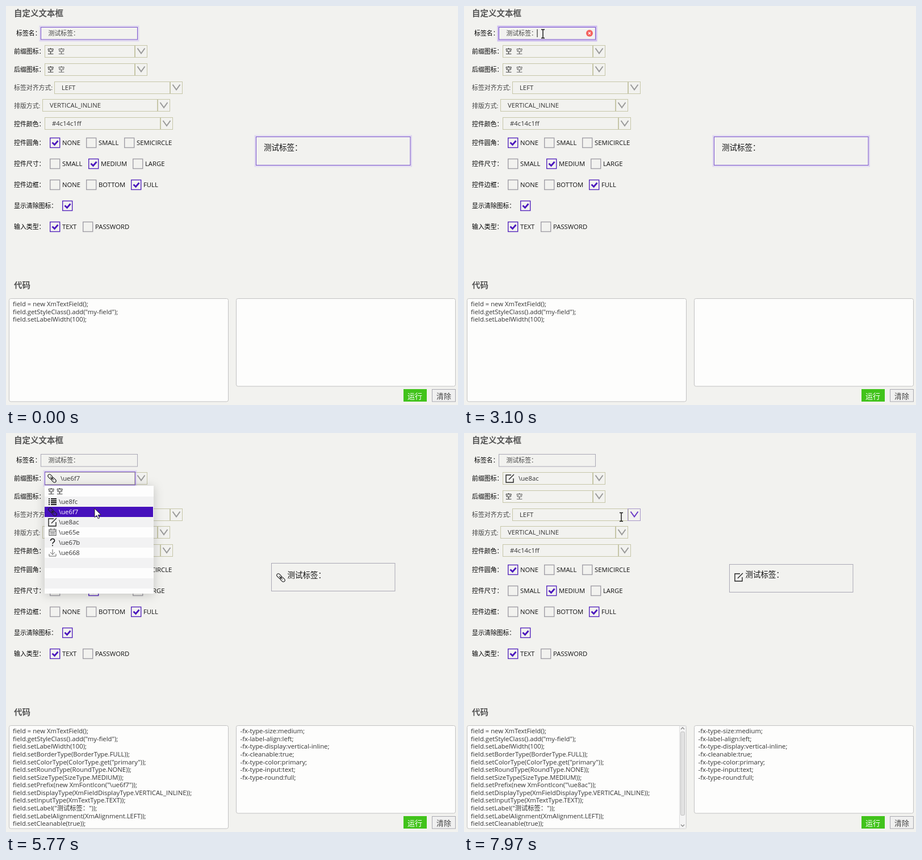
Recreate the animation shown at these times as an HTML page. Size 796 by 703 pixels, loop 8000 ms.

```html
<!DOCTYPE html>
<html lang="zh-CN">
<head>
<meta charset="utf-8">
<style>
html, body { margin: 0; width: 100%; height: 100%; overflow: hidden; background: #f2f2ef; }
svg { display: block; width: 796px; height: 703px; }
text { font: 11.3px "Open Sans", "Noto Sans CJK SC", "Noto Sans CJK", sans-serif; fill: #333; white-space: pre; }
.label { font-size: 10.9px; fill: #000; }
.soft { fill: #444; }
.dark { fill: #111; }
.title { font-size: 14.5px; font-weight: 700; fill: #555; }
.big { font-size: 13.5px; fill: #111; }
.button { font-size: 13px; }
.white { fill: #fff; }
.line { fill: none; stroke: #c6c6a8; }
.field { fill: none; stroke: #aaa8b5; }
.focus { fill: none; stroke: #7a55cc; }
.halo { fill: none; stroke: #b79df0; stroke-width: 3; opacity: .3; }
.area { fill: #fdfdfc; stroke: #c2c2c2; }
.chevron { fill: none; stroke: #9a9a9a; stroke-width: 2; }
.hot .chevron { stroke: #6a3cc6; }
.hot .side { stroke: #a796c8; }
.box { fill: none; stroke: #a09ea6; stroke-width: 1.4; }
.checked .box { stroke: #5526bd; }
.tick { fill: none; stroke: #4a14bd; stroke-width: 2.8; }
.icon { fill: none; stroke: #222; stroke-width: 1.1; }
#popup { filter: drop-shadow(0 2px 9px rgba(0, 0, 0, .2)); }
</style>
</head>
<body>
<svg id="stage" viewBox="0 0 796 703"></svg>
<script>
const LOOP = 8000, OPEN = 4740, PICK_LINK = 5770, PICK_EDIT = 6630, CLOSE = 7620;
const PURPLE = '#4610bc', LABEL = '测试标签：';
const ROW = 18, rowTop = i => 94 + i * ROW;

const text = (x, y, s, cls = '', id = '') => `<text x="${x}" y="${y}" class="${cls}" id="${id}">${s}</text>`;
const rect = (x, y, w, h, attrs) => `<rect x="${x}" y="${y}" width="${w}" height="${h}" ${attrs}/>`;
const group = (id, body) => `<g id="${id}">${body}</g>`;

// Icons are drawn around their centre.
const icons = {
  none: '',
  list: '<path d="M-7-5h2m2 0h10M-7-1.7h2m2 0h10M-7 1.7h2m2 0h10M-7 5h2m2 0h10" stroke-width="2.2"/>',
  link: '<g transform="rotate(45)"><rect x="-9" y="-2.8" width="9.5" height="5.6" rx="2.8"/><rect x="-.5" y="-2.8" width="9.5" height="5.6" rx="2.8"/><path d="M-4 0h8"/></g>',
  edit: '<path d="M2-6h-9v13h13v-7M-2 2L7-7" stroke-width="1.4"/>',
  calendar: '<path d="M-6-5h12v10.5h-12zM-6-2h12M-3-7v3M3-7v3M-4 .5h8M-4 3h8" stroke="#555"/>',
  help: '<path d="M-3.5-3c0-5 7.5-4.5 7 0c-.4 2.5-3.5 2.5-3.5 5.2M0 4.2v2" stroke-width="1.7"/>',
  download: '<path d="M0-6v9M-4-1L0 3.3 4-1M-6 2v4h12v-4" stroke="#666" stroke-width="1"/>'
};
const icon = (name, x, y) => `<g class="icon" transform="translate(${x} ${y})">${icons[name]}</g>`;
const rows = [['none', '空'], ['list', '\\ue8fc'], ['link', '\\ue6f7'], ['edit', '\\ue8ac'],
  ['calendar', '\\ue65e'], ['help', '\\ue67b'], ['download', '\\ue668']];

const combos = [
  { label: '前缀图标：', x: 68, y: 69, split: 227 },
  { label: '后缀图标：', x: 68, y: 101, split: 227 },
  { label: '标签对齐方式:', x: 85, y: 133, split: 289, value: 'LEFT' },
  { label: '排版方式:', x: 64, y: 164.5, split: 267, value: 'VERTICAL_INLINE' },
  { label: '控件颜色：', x: 68, y: 196.5, split: 272, value: '#4c14c1ff' }
];
const empty = y => text(73, y, '空', 'dark') + text(92, y, '空', 'soft');

function combo({ label, x, y, split, value }, i) {
  const top = Math.floor(y) + .5;
  return text(14, y + 15, label, i === 2 || i === 3 ? 'label soft' : 'label') + group('combo' + i,
    rect(x + .5, top, split - x, 21, 'class="line"') +
    rect(split - .5, top, 22, 21, 'class="line side"') +
    `<path class="chevron" d="M${split + 4.5} ${y + 5.5}l6.500 9 6.500-9"/>`) +
    (value ? text(x + 13, y + 14.5, value) : '');
}

function check(x, y, on, label = '') {
  return `<g class="${on ? 'checked' : ''}">` + rect(x + .7, y - 8.5, 17, 17, 'class="box"') +
    (on ? `<path class="tick" d="M${x + 4.5} ${y - .5}l4 4 6-7"/>` : '') + '</g>' +
    text(x + 22, y + 4, label, 'dark');
}
const checkRow = (label, y, ...boxes) =>
  text(14, y + 4, label, 'label') + boxes.map(([x, on, s]) => check(x, y, on, s)).join('');

const code = (lines, x) => lines.map((s, i) => text(x, 529.2 + i * 13.58, s)).join('');
const intro = ['field = new XmTextField();', 'field.getStyleClass().add("my-field");', 'field.setLabelWidth(100);'];
const setters = glyph => [...intro, 'field.setBorderType(BorderType.FULL));',
  'field.setColorType(ColorType.get("primary"));', 'field.setRoundType(RoundType.NONE));',
  'field.setSizeType(SizeType.MEDIUM));', `field.setPrefix(new XmFontIcon("${glyph}"));`,
  'field.setDisplayType(XmFieldDisplayType.VERTICAL_INLINE));', 'field.setInputType(XmTextType.TEXT));',
  `field.setLabel("${LABEL}"));`, 'field.setLabelAlignment(XmAlignment.LEFT));', 'field.setCleanable(true));'];
const styles = ['-fx-type-size:medium;', '-fx-label-align:left;', '-fx-type-display:vertical-inline;',
  '-fx-cleanable:true;', '-fx-type-color:primary;', '-fx-type-input:text;', '-fx-type-round:full;'];

const picked = ([name, glyph]) => icon(name, 81, 80) + text(96, 84, glyph);
const result = name => icon(name, 484, 254);

const popup = rect(68, 93, 192, 190, 'fill="#fdfdfd"') +
  [1, 3, 5, 7, 9].map(i => rect(68, rowTop(i), 192, ROW, 'fill="#f2f2f3"')).join('') +
  rect(68, 0, 191, ROW, 'id="hover" fill="#ebe7f3"') +
  rect(68, 0, 191, ROW, `id="chosen" fill="${PURPLE}"`) +
  rows.map(([name, s], i) => {
    const y = rowTop(i) + 9;
    return (i ? icon(name, 82, y) : text(74, y + 4, '空', 'dark')) + text(i ? 93 : 89, y + 4, s, '', 'row' + i);
  }).join('');

const scrollbar = rect(379.5, 516, 11.5, 181, 'fill="#f4f4f4" stroke="#dedede"') +
  rect(381.5, 526.5, 7, 147, 'rx="2" fill="#e2e2e2" stroke="#c0c0c0"') +
  '<path d="M382 522l3-3 3 3M382 690l3 3 3-3" fill="none" stroke="#888" stroke-width="1.3"/>';

stage.innerHTML =
  text(14, 18, '自定义文本框', 'title') + text(18, 52, '标签名：', 'label') +
  group('fieldFocus', rect(60, 36, 173, 25, 'class="halo" id="fieldHalo"')) +
  rect(61.5, 37.5, 170, 21.5, 'id="field"') + text(74.5, 52, LABEL, 'label soft') +
  rect(128.5, 41, 1.1, 14, 'id="caret" fill="#222"') +
  group('clear', '<circle cx="221" cy="48" r="6" fill="#f4625e"/><path d="M219 46l4 4m0-4l-4 4" stroke="#fff" stroke-width="1.1"/>') +
  combos.map(combo).join('') + empty(116) +
  group('valueNone', empty(84)) + group('valueLink', picked(rows[2])) + group('valueEdit', picked(rows[3])) +
  checkRow('控件圆角：', 241, [77, 1, 'NONE'], [141, 0, 'SMALL'], [208, 0, 'SEMICIRCLE']) +
  checkRow('控件尺寸：', 278, [77, 0, 'SMALL'], [145, 1, 'MEDIUM'], [223, 0, 'LARGE']) +
  checkRow('控件边框：', 315, [77, 0, 'NONE'], [141, 0, 'BOTTOM'], [220, 1, 'FULL']) +
  checkRow('显示清除图标：', 352, [99, 1]) +
  checkRow('输入类型：', 389, [77, 1, 'TEXT'], [135, 0, 'PASSWORD']) +
  group('previewFocused', rect(439, 229, 274.5, 53, 'class="halo"') +
    rect(440.5, 230.5, 271.5, 50, 'class="focus"') + text(454, 253.5, LABEL, 'big')) +
  group('preview', rect(467.5, 231.5, 217.5, 49, 'class="field" id="frame"') +
    group('content', text(495.5, 253.5, LABEL, 'big') +
      group('resultLink', result('link')) + group('resultEdit', result('edit')))) +
  text(14, 496.5, '代码', 'title') +
  rect(5.5, 515.5, 386, 181.5, 'rx="3" class="area"') + rect(405.5, 515.5, 386, 154.5, 'rx="3" class="area"') +
  group('codeIntro', code(intro, 12)) + group('codeLink', code(setters('\\ue6f7'), 12)) +
  group('codeEdit', code(setters('\\ue8ac'), 12)) + group('css', code(styles, 412.5)) +
  group('scroll', scrollbar) +
  rect(700, 675, 41, 22, 'fill="#41c31b"') + text(707, 691.5, '运行', 'button white') +
  rect(750.5, 675.5, 41, 21.5, 'fill="#f0f0f0" stroke="#a9a9b0"') + text(758, 691.5, '清除', 'button soft') +
  group('comboFocus', rect(67, 67, 162, 26, 'class="halo"') + rect(68.5, 68.5, 159, 23, 'class="focus"')) +
  group('popup', popup) +
  group('arrow', '<path d="M0 0v15.500l3.700-3.400 2.500 5.700 2.400-1-2.500-5.500h5z" fill="#fff" stroke="#222"/>') +
  group('beam', '<path d="M-3-7.500h2.200l.8.700.8-.7h2.200M-3 7.500h2.200l.8-.7.8.7h2.200M0-7v14" fill="none" stroke="#111" stroke-width="1.400"/>');

// Pointer path: time, x, y
const path = [
  [30, 792, 700], [300, 530, 505], [600, 339, 367], [800, 339, 367], [1250, 220, 215], [1630, 127, 98],
  [1870, 102, 17], [2040, 102, 17], [2300, 125, 45], [2500, 143, 53], [2640, 143, 53], [2830, 139, 49],
  [3840, 139, 49], [4150, 148, 125], [4380, 152, 177], [4630, 156, 95], [4740, 156, 79], [5030, 156, 76],
  [5500, 156, 78], [5600, 156, 133], [5770, 156, 133], [6200, 158, 146], [6570, 157, 154], [6830, 161, 155],
  [7030, 181, 211], [7430, 365, 215], [7500, 372, 216], [7640, 366, 208], [7970, 277, 148]
];
function pointer(t) {
  const i = path.findIndex(p => p[0] > t);
  if (i < 0) return path[path.length - 1].slice(1);
  if (!i) return path[0].slice(1);
  const [t0, x0, y0] = path[i - 1], [t1, x1, y1] = path[i], k = (t - t0) / (t1 - t0);
  return [x0 + (x1 - x0) * k, y0 + (y1 - y0) * k];
}

const el = id => document.getElementById(id);
const show = (id, on) => el(id).style.display = on ? '' : 'none';
const move = (id, x, y) => el(id).setAttribute('transform', `translate(${x} ${y})`);
const inside = ([x, y], l, t, r, b) => x >= l && x < r && y >= t && y < b;

function render(t) {
  const p = pointer(t), open = t >= OPEN && t < CLOSE;
  const link = t >= PICK_LINK && t < PICK_EDIT, edit = t >= PICK_EDIT, none = t < PICK_LINK;
  const focused = t < OPEN, overField = !open && inside(p, 61, 37, 232, 60);
  let beam = overField;

  combos.forEach((c, i) => {
    const hot = !open && inside(p, c.x, c.y, c.split + 22, c.y + 22);
    el('combo' + i).setAttribute('class', hot ? 'hot' : '');
    if (hot && i > 1 && p[0] < c.split) beam = true;
  });

  show('fieldFocus', focused);
  el('field').setAttribute('class', focused ? 'focus' : 'field');
  el('fieldHalo').style.opacity = overField ? .6 : .3;
  show('clear', overField);
  show('caret', t >= 3100 && t < 3600);

  for (const part of ['value', 'result', 'code']) {
    show(part + 'Link', link);
    show(part + 'Edit', edit);
  }
  show('valueNone', none);
  show('codeIntro', none);
  show('previewFocused', none);
  show('preview', !none);
  show('css', !none);

  // The layout settles one step after the first pick.
  const settled = t >= PICK_LINK + 30;
  show('scroll', settled);
  move('frame', 0, settled ? 0 : -2);
  move('content', 0, settled ? 0 : 1);

  show('comboFocus', open);
  show('popup', open);
  el('popup').style.opacity = Math.min(1, (t - OPEN) / 120);
  const chosen = none ? 0 : link ? 2 : 3;
  el('chosen').setAttribute('y', rowTop(chosen));
  rows.forEach((_, i) => el('row' + i).setAttribute('class', i === chosen ? 'white' : i ? '' : 'dark'));
  const late = pointer(t - 70);
  show('hover', inside(late, 68, rowTop(0), 260, rowTop(rows.length)));
  el('hover').setAttribute('y', rowTop(Math.floor((late[1] - rowTop(0)) / ROW)));

  show('arrow', t >= 30 && !beam);
  show('beam', t >= 30 && beam);
  for (const id of ['arrow', 'beam']) move(id, ...p.map(Math.round));
}

let start;
function tick(now) {
  start ??= now;
  render((now - start) % LOOP);
  requestAnimationFrame(tick);
}
render(0);
requestAnimationFrame(tick);
</script>
</body>
</html>
```
